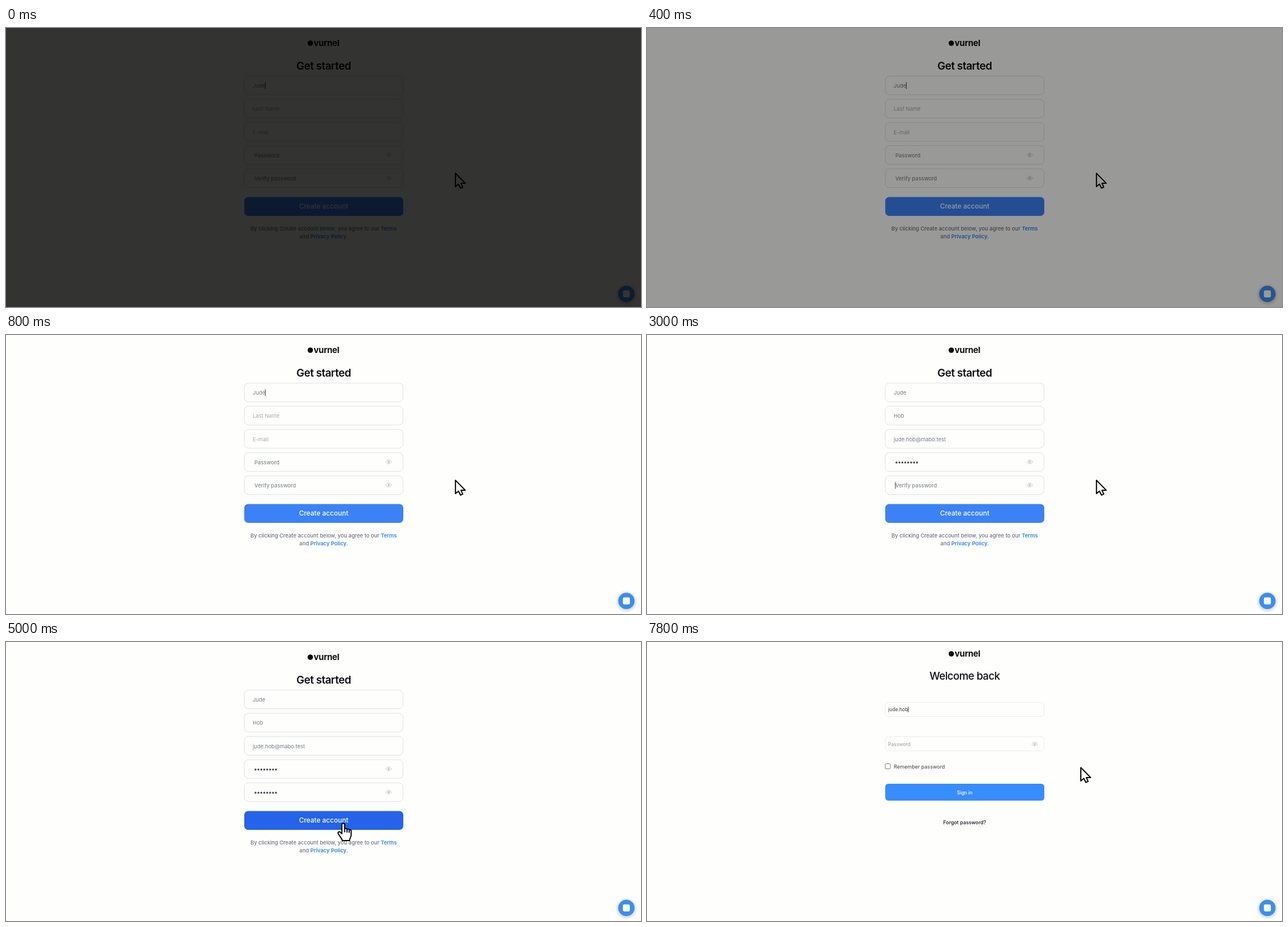
An HTML page for the animation above (8 s loop, 1130 by 496 pixels).

```html
<!DOCTYPE html>
<html lang="en">
<head>
<meta charset="utf-8">
<title>Sign-up walkthrough</title>
<style>
  html, body { margin: 0; width: 100%; height: 100%; overflow: hidden; background: #fefefd; }
  svg { display: block; width: 1130px; height: 496px; font-family: Inter, Roboto, Arial, sans-serif; }
  .mid { text-anchor: middle; }
  .brand { font-weight: 700; font-size: 15px; letter-spacing: -.2px; fill: #0c0c0e; }
  .title { font-weight: 600; font-size: 18.93px; letter-spacing: -.025em; fill: #0b0c10; }
  .greet { font-weight: 500; font-size: 18.7px; letter-spacing: -.03em; fill: #0b0c10; }
  .field { fill: #fefefd; stroke: #dfe1e4; }
  .pale { stroke: #ececee; }
  .typed { font-size: 9.5px; fill: #767d87; }
  .hint { fill: #a6aaaf; }
  .strong { font-weight: 500; fill: #868a91; }
  .note { font-weight: 500; font-size: 9.47px; fill: #6e737c; }
  .link { font-weight: 600; fill: #2f87e2; }
  .button { font-weight: 500; font-size: 12px; fill: #fff; }
  .login { font-size: 8.65px; fill: #33363b; }
  .caret { stroke: #333; stroke-width: 1; }
  .pointer { fill: #fff; stroke: #000; stroke-width: 2; stroke-linejoin: round; }
</style>
</head>
<body>
<svg viewBox="0 0 1130 496">
  <defs>
    <g id="eye" fill="none" stroke="#c3c6ca">
      <path d="M-5.2 0Q0 -7 5.2 0Q0 7 -5.2 0Z"/>
      <circle r="1.5" fill="#c3c6ca"/>
    </g>
    <g id="brand">
      <circle cx="541.5" cy="27" r="4.8" fill="#0c0c0e"/>
      <text class="brand" x="547.5" y="32">vurnel</text>
    </g>
    <radialGradient id="glow">
      <stop offset=".65" stop-color="#000" stop-opacity=".16"/>
      <stop offset="1" stop-color="#000" stop-opacity="0"/>
    </radialGradient>
  </defs>
  <rect width="1130" height="496" fill="#fefefd"/>

  <g id="signup">
    <use href="#brand"/>
    <text class="title mid" x="565.3" y="73.8">Get started</text>
    <g id="rows"></g>
    <rect id="create" x="424" y="300.5" width="283" height="33.5" rx="7"/>
    <text class="button mid" x="565.3" y="321">Create account</text>
    <text class="note mid" x="565.3" y="359.5">By clicking Create account below, you agree to our <tspan class="link">Terms</tspan></text>
    <text class="note mid" x="565.3" y="374.2">and <tspan class="link">Privacy Policy.</tspan></text>
  </g>

  <g id="signin">
    <rect width="1130" height="496" fill="#fefefd"/>
    <use href="#brand" y="-6"/>
    <text class="greet mid" x="565.3" y="67.3">Welcome back</text>
    <rect class="field pale" x="424" y="107.5" width="282.5" height="25" rx="5.5"/>
    <text id="login" class="login" x="429" y="123"></text>
    <path id="loginCaret" class="caret"/>
    <rect class="field pale" x="424" y="168.5" width="282.5" height="25" rx="5.5"/>
    <text class="login" x="429" y="184.5" style="fill:#94979b">Password</text>
    <use href="#eye" x="690" y="181.5"/>
    <rect x="424" y="216.5" width="9" height="9" rx="1.5" fill="#fff" stroke="#74777b"/>
    <text x="439" y="224.5" font-size="9.1" fill="#3a3d42">Remember password</text>
    <rect x="424" y="252" width="283" height="30" rx="5.5" fill="#378dfc"/>
    <text class="mid" x="565.3" y="270.6" font-size="8.55" font-weight="500" fill="#fff">Sign in</text>
    <text class="mid" x="565.3" y="323.6" font-size="8.95" font-weight="500" fill="#15171b">Forgot password?</text>
  </g>

  <circle cx="1104" cy="474" r="20" fill="url(#glow)"/>
  <circle cx="1104" cy="472.7" r="14.5" fill="#3a8ef0"/>
  <rect x="1097.8" y="466.5" width="12.4" height="12.4" rx="2.4" fill="#fff"/>

  <g id="cursor">
    <path id="arrow" class="pointer" d="M0 0V23.8L5.4 19.2L9 26.4L13 24.6L9.8 17.6H17.4Z"/>
    <path id="hand" class="pointer" d="M-2.3 2.8A2.4 2.4 0 0 1 2.6 2.8V11A2.2 2.2 0 0 1 6.8 11.8A2.1 2.1 0 0 1 10.7 12.8A1.9 1.9 0 0 1 14.2 14V21.5C14.2 25 11.7 26.5 11.3 31.3H-1.5C-2 28 -5 25 -8.5 19.5C-10.3 16.4 -7.4 14.4 -5 16.4L-2.3 19ZM2.6 11V16.5M6.8 12V17M10.7 13V17.5"/>
  </g>
  <rect id="shade" width="1130" height="496"/>
</svg>
<script>
const LOOP = 8000, TICK = 200;
const NS = 'http://www.w3.org/2000/svg';
const $ = id => document.getElementById(id);

// Typing: [time, characters shown]
const FIELDS = [
  { hint: 'Last Name', text: 'Jude', focus: [0, 1000], keys: [[0, 4]] },
  { hint: 'Last Name', text: 'Hob', focus: [1000, 1400], keys: [[1000, 1], [1200, 3]] },
  { hint: 'E-mail', text: 'jude.hob@mabo.test', focus: [1400, 2600], keys: [[1600, 5], [1800, 9], [2000, 14], [2200, 18]] },
  { hint: 'Password', secret: true, focus: [2600, 3000], keys: [[2600, 4], [2800, 8]] },
  { hint: 'Verify password', secret: true, focus: [3000, 4000], keys: [[3200, 4], [3400, 8]] }
];
const LOGIN = { text: 'jude.hob', keys: [[7200, 2], [7400, 5], [7600, 8]] };

// Pointer stops: [time, x, y]
const PATH = [[3800, 799.8, 258.3], [5000, 600, 321.8], [5200, 600, 321.8], [6000, 772, 223.3]];

function add(parent, tag, attrs) {
  const el = document.createElementNS(NS, tag);
  for (const k in attrs) el.setAttribute(k, attrs[k]);
  return parent.appendChild(el);
}

function buildRow(f, i) {
  const y = 85.5 + 41.2 * i;
  f.x = f.secret ? 442 : 439;
  f.y = y + 17;
  add($('rows'), 'rect', { class: 'field', x: 424, y, width: 282.5, height: 33.3, rx: 7.5 });
  f.label = add($('rows'), 'text', { x: f.x, y: f.y + 3.6 });
  f.caret = add($('rows'), 'path', { class: 'caret' });
  f.dots = [];
  if (!f.secret) return;
  for (let n = 0; n < 8; n++) {
    f.dots.push(add($('rows'), 'circle', { cx: 444 + 5.2 * n, cy: f.y + 0.6, r: 1.75, fill: '#44474c' }));
  }
  add($('rows'), 'use', { href: '#eye', x: 681, y: f.y - 0.5 });
}

const show = (el, on) => { el.style.display = on ? '' : 'none'; };
const typedCount = (keys, t) => keys.reduce((n, [at, len]) => t >= at ? len : n, 0);
const clamp = v => Math.min(1, Math.max(0, v));
const ease = p => p * p * (3 - 2 * p);

function setCaret(el, x, y, h, on) {
  el.setAttribute('d', `M${x} ${y - h / 2}v${h}`);
  show(el, on);
}

function drawRow(f, t) {
  const n = typedCount(f.keys, t);
  f.label.textContent = n ? (f.secret ? '' : f.text.slice(0, n)) : f.hint;
  f.label.setAttribute('class', 'typed' + (f.secret ? ' strong' : n ? '' : ' hint'));
  f.dots.forEach((d, i) => show(d, i < n));
  const width = !n ? 0 : f.secret ? 5.2 * n : f.label.getComputedTextLength();
  setCaret(f.caret, f.x + width, f.y, 12, t >= f.focus[0] && t < f.focus[1]);
}

function pointerAt(t) {
  let [, x, y] = PATH[0];
  for (let i = 1; i < PATH.length; i++) {
    const [t0, x0, y0] = PATH[i - 1], [t1, x1, y1] = PATH[i];
    if (t < t0) break;
    const p = ease(clamp((t - t0) / (t1 - t0)));
    x = x0 + (x1 - x0) * p;
    y = y0 + (y1 - y0) * p;
  }
  return [x, y];
}

function draw(t) {
  FIELDS.forEach(f => drawRow(f, t));

  const [x, y] = pointerAt(t);
  const over = x > 424 && x < 707 && y > 300 && y < 334;
  $('cursor').setAttribute('transform', `translate(${x} ${y})`);
  show($('arrow'), !over);
  show($('hand'), over);
  $('create').setAttribute('fill', over ? '#2563eb' : '#3b82f6');

  const mix = clamp((t - 6400) / 600);
  $('signin').setAttribute('opacity', mix);
  show($('signin'), mix > 0);
  if (mix > 0) {
    const n = typedCount(LOGIN.keys, t);
    $('login').textContent = LOGIN.text.slice(0, n);
    setCaret($('loginCaret'), 429.3 + (n ? $('login').getComputedTextLength() : 0), 120, 10, true);
  }

  $('shade').setAttribute('opacity', 0.8 * (1 - clamp(t / 800)));
}

FIELDS[0].hint = 'First Name';
FIELDS.forEach(buildRow);
const start = performance.now();
function frame() {
  const t = (performance.now() - start) % LOOP;
  draw(Math.floor(t / TICK) * TICK);
  requestAnimationFrame(frame);
}
frame();
</script>
</body>
</html>
```
